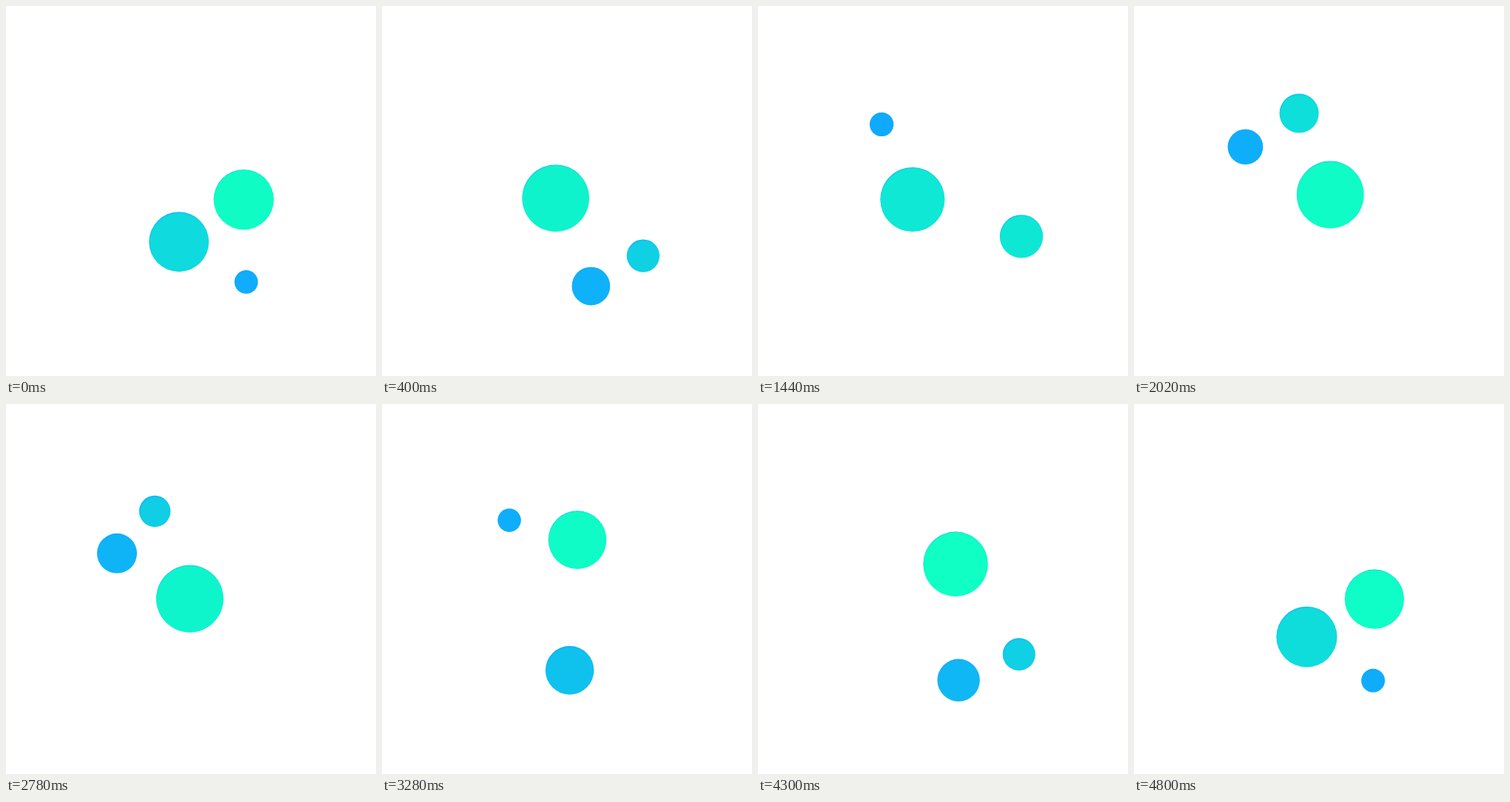
An HTML page with a canvas that plays this animation: 500 px wide and 500 px high, repeating every 4.82 s.

```html
<!DOCTYPE html>
<html>
<head>
<meta charset="utf-8">
<style>
html, body { margin: 0; height: 100%; overflow: hidden; background: #fff; }
canvas { display: block; }
</style>
</head>
<body>
<canvas id="stage" width="500" height="500"></canvas>
<script>
const ctx = document.getElementById('stage').getContext('2d');
const LOOP = 4820;
const DELAYS = [0, 915, -845];

// Figure-eight track: time, x, y
const track = [
  [0, 324.5, 373], [115, 335.5, 367.5], [235, 345, 359], [420, 353.5, 335],
  [595, 356, 311.5], [800, 341, 277], [905, 323.3, 262.7], [1175, 265.5, 255],
  [1440, 209, 261.5], [1715, 161.5, 236], [1935, 150, 202], [2020, 150.5, 190.5],
  [2355, 167, 160], [2535, 179, 154.5], [2780, 201, 145], [2935, 223, 145],
  [3085, 245, 153], [3300, 265, 187], [3475, 266.5, 220], [3695, 248.5, 263],
  [3780, 242, 278], [3965, 233.5, 316.5], [4155, 248, 353.5], [4320, 274, 375],
  [4500, 299, 381], [4695, 314, 377.5], [4775, 321.2, 374.5]
];

function knot(i) {
  const n = track.length, [t, x, y] = track[(i + n) % n];
  return [t + Math.floor(i / n) * LOOP, x, y];
}

// Hermite spline through unevenly timed knots
function position(t) {
  let i = track.length - 1;
  while (track[i][0] > t) i--;
  const [a, b, c, d] = [-1, 0, 1, 2].map(k => knot(i + k));
  const span = c[0] - b[0], u = (t - b[0]) / span;
  const slope = (p, q, r, k) => {
    const h = q[0] - p[0], g = r[0] - q[0];
    return ((q[k] - p[k]) / h * g + (r[k] - q[k]) / g * h) / (h + g);
  };
  return [1, 2].map(k =>
    b[k] * (1 + 2 * u) * (1 - u) ** 2 + c[k] * u * u * (3 - 2 * u) +
    span * u * (1 - u) * (slope(a, b, c, k) * (1 - u) - slope(b, c, d, k) * u));
}

// Swings twice per loop, highest at the given time
const wave = (t, peak) => Math.cos(4 * Math.PI * (t - peak) / LOOP);

const tint = k => `rgb(15,${168 + 87 * k},${255 - 59 * k})`;

function drawBall(t) {
  const [x, y] = position(t);
  const r = 30.7 + 14.9 * wave(t, 1237);
  const k = 0.5 + 0.5 * wave(t, 1025);
  const shift = 0.8 + 2 * (1 - k);
  const cx = x + 0.4 * shift, cy = y + 0.9 * shift;
  const shade = ctx.createRadialGradient(cx, cy, r - shift, cx, cy, r + shift);
  shade.addColorStop(0, tint(k));
  shade.addColorStop(0.5, tint(k * 0.8));
  shade.addColorStop(1, tint(0));
  ctx.fillStyle = shade;
  ctx.beginPath();
  ctx.arc(x, y, r, 0, 2 * Math.PI);
  ctx.fill();
}

function draw(now) {
  ctx.clearRect(0, 0, 500, 500);
  for (const delay of DELAYS) drawBall((now + delay + LOOP) % LOOP);
}

const start = performance.now();
function tick() {
  draw(performance.now() - start);
  requestAnimationFrame(tick);
}
tick();
</script>
</body>
</html>
```
